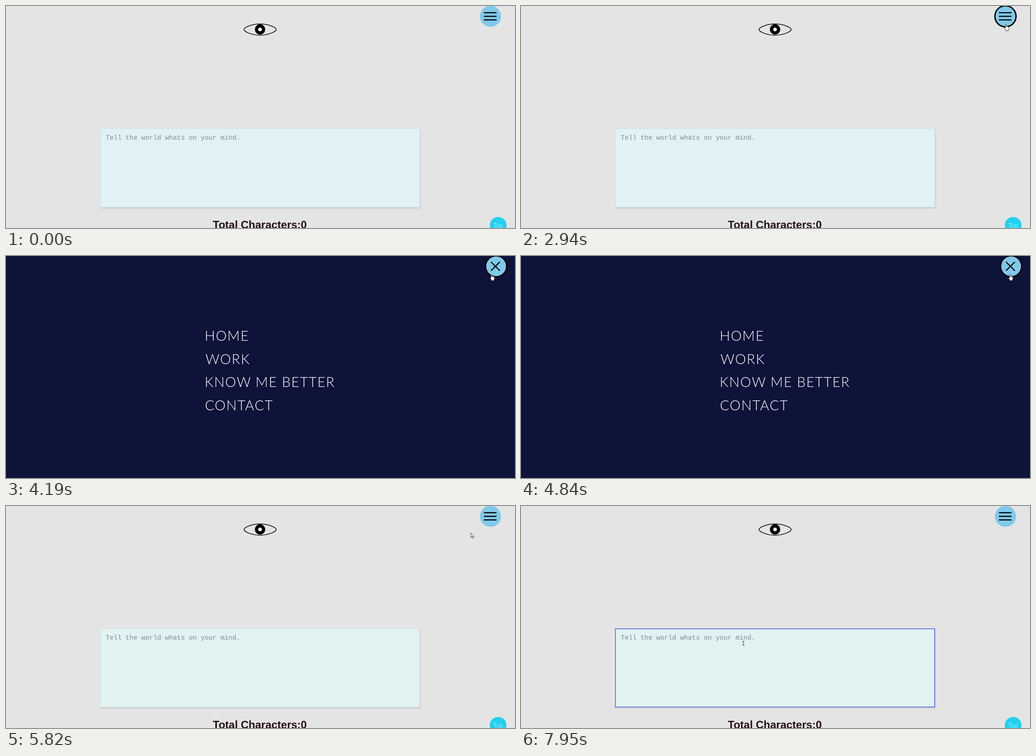
Recreate the animation shown at these times as an HTML page. Size 1131x495 px, loop 8 s.

```html
<!DOCTYPE html>
<html lang="en">
<head>
<meta charset="utf-8">
<title>Share a thought</title>
<style>
  html, body { margin: 0; width: 100%; height: 100%; overflow: hidden; background: #e4e4e4; }
  svg { display: block; width: 100%; height: 100%; }
  .light { font-family: Lato, "Open Sans", sans-serif; font-weight: 300; fill: #fff; }
  .menu { font-size: 30.5px; letter-spacing: 1.6px; }
  .top { font-size: 13px; letter-spacing: .3px; text-anchor: middle; }
  .total { font: bold 24px "Liberation Sans", Arial, sans-serif; fill: #24101a; }
  .hint { font: 14.667px "Liberation Mono", "Courier New", monospace; fill: #7e8b90; }
  #box { filter: drop-shadow(1px 2px 1.5px rgba(0, 0, 0, .13)); }
  #bars line { stroke: #000; stroke-width: 2.4; }
  #cursor path { stroke-linejoin: round; }
</style>
</head>
<body>
<svg viewBox="0 0 1131 495">
  <defs>
    <clipPath id="disc"><circle cx="1076.5" cy="23" r="23.5"/></clipPath>
  </defs>
  <g id="page">
    <rect width="1131" height="495" fill="#e4e4e4"/>
    <g fill="none" stroke="#000">
      <path d="M528.8 52.4C529 47 548 40 564.5 40S600.2 47 600.4 52.4C600.2 58 581 65.2 564.5 65.2S529 58 528.8 52.4Z" stroke-width="1.5"/>
      <circle cx="564.5" cy="52.2" r="7.7" stroke-width="7.4" fill="#fff"/>
    </g>
    <rect id="box" x="209.75" y="273.75" width="709.5" height="174.5" stroke-width="1.5"/>
    <text class="hint" x="221.6" y="298">Tell the world whats on your mind.</text>
    <rect id="caret" x="222" y="286" width="1" height="16"/>
    <text class="total" x="459.5" y="496">Total Characters:0</text>
    <circle cx="1093.5" cy="489" r="18.6" fill="#22d0f0"/>
    <text class="light top" x="1093.5" y="494">Top</text>
  </g>
  <g id="menu" class="light menu">
    <rect width="1131" height="495" fill="#0e1339"/>
    <text x="441.5" y="189">HOME</text>
    <text x="443.3" y="240.7">WORK</text>
    <text x="441.5" y="292.4">KNOW ME BETTER</text>
    <text x="442" y="344">CONTACT</text>
  </g>
  <g id="button">
    <circle cx="1076.5" cy="23" r="23.5" fill="#80c9ea"/>
    <g id="bars" clip-path="url(#disc)">
      <line x1="-14" x2="14"/><line x1="-14" x2="14"/><line x1="-14" x2="14"/>
    </g>
    <circle id="ring" cx="1076.5" cy="23" r="23.5" fill="none" stroke="#000" stroke-width="3"/>
  </g>
  <g id="cursor">
    <path id="arrow" d="M.4 .5V10.4L2.7 8.3L4.2 11.7L5.7 11L4.3 7.8H7.5Z" fill="#fff" stroke="#000" stroke-width=".8"/>
    <path id="hand" d="M-1.1 .6Q0-.9 1.1 .6V4.6Q2.3 3.7 3.1 5Q4.3 4.3 4.9 5.5Q6.3 5 6.5 6.6V9.4Q6.3 11.4 5.2 12.4V14H-.4V12.5L-3.2 8.5Q-3.4 7-2 7.2L-1.1 8.2Z" fill="#fff" stroke="#000" stroke-width=".8"/>
    <path id="beam" d="M-2.5-4.5H-.6L0-4L.6-4.5H2.5M0-4V4M-2.5 4.5H-.6L0 4L.6 4.5H2.5" fill="none" stroke="#333" stroke-width="1"/>
    <circle id="click" r="9" fill="#ff0" fill-opacity=".47"/>
  </g>
</svg>
<script>
const LOOP = 8000;
const $ = id => document.getElementById(id);
const bars = [...$("bars").children];

// Pointer moves: first and last change (ms), number of steps, start, bend, end
const moves = [
  [460, 1220, 10, [1078, 495], [1110, 300], [1093, 101]],
  [1290, 1290, 1, [1093, 101], [1091, 95], [1089, 89]],
  [1770, 2520, 10, [1089, 89], [1086, 62], [1077.5, 41]],
  [4190, 4430, 4, [1077.5, 41], [1082, 41], [1086.5, 41]],
  [5710, 6470, 10, [1086.5, 41], [830, 130], [521.5, 275]],
  [6870, 7180, 5, [521.5, 275], [506, 288], [494.2, 306]],
];
const clicks = [[2670, 2940], [4590, 4840], [7410, 7640]];
// Hamburger (0) to cross (1)
const crossing = [[0, 0], [3190, .67], [3260, 1], [5010, .47], [5070, .12], [5170, 0]];

const within = (t, [from, to]) => t >= from && t < to;
const near = ([x, y], cx, cy, r) => Math.hypot(x - cx, y - cy) < r;
const show = (id, on) => $(id).setAttribute("visibility", on ? "inherit" : "hidden");
const smooth = u => u * u * (3 - 2 * u);
const clamp = u => Math.max(0, Math.min(1, u));

function pointerAt(t) {
  const move = moves.findLast(m => t >= m[0]);
  if (!move) return null;
  const [start, end, steps, a, b, c] = move;
  const gap = steps > 1 ? (end - start) / (steps - 1) : 1;
  const step = Math.min(steps, Math.floor((t - start) / gap + 1e-6) + 1);
  const u = smooth(step / steps), v = 1 - u;
  return a.map((p, i) => v * v * p + 2 * u * v * b[i] + u * u * c[i]);
}

function placeBars(p) {
  const x = 1076 - p - 4 * p * (1 - p);
  bars[0].setAttribute("transform", `translate(${x} ${15 + 8 * p}) rotate(${-45 * p})`);
  bars[1].setAttribute("transform", `translate(${1076 + 27 * p * p} 23)`);
  bars[1].setAttribute("opacity", clamp(2.6 - 3.2 * p));
  bars[2].setAttribute("transform", `translate(${x} ${31 - 8 * p}) rotate(${45 * p})`);
}

function draw(t) {
  const open = within(t, [3190, 5010]);
  const focus = t >= 7410;
  const shift = open ? 12.5 : 0;
  const pos = pointerAt(t);

  show("page", !open);
  show("menu", open);
  $("box").setAttribute("fill", t < 3190 ? "#e0f2f6" : "#e0f2f2");
  $("box").setAttribute("stroke", focus ? "#4260e2" : "#d6e6e9");
  show("caret", !open && within(t, [7410, 7950]));
  $("button").setAttribute("transform", `translate(${shift} 0)`);
  placeBars(crossing.findLast(k => t >= k[0])[1]);

  const overButton = !!pos && near(pos, 1076.5 + shift, 23, 25);
  const overTop = !!pos && !open && near(pos, 1093.5, 489, 18.6);
  const overBox = !!pos && !open && pos[0] > 209 && pos[0] < 920 && pos[1] > 273 && pos[1] < 449;
  const hand = overButton || overTop;
  show("ring", overButton);
  show("cursor", pos);
  show("hand", pos && hand);
  show("beam", pos && overBox);
  show("arrow", pos && !hand && !overBox);
  show("click", clicks.some(c => within(t, c)));
  if (pos) $("cursor").setAttribute("transform", `translate(${pos})`);
}

const begin = performance.now();
function tick() {
  draw((performance.now() - begin) % LOOP);
  requestAnimationFrame(tick);
}
tick();
</script>
</body>
</html>
```
